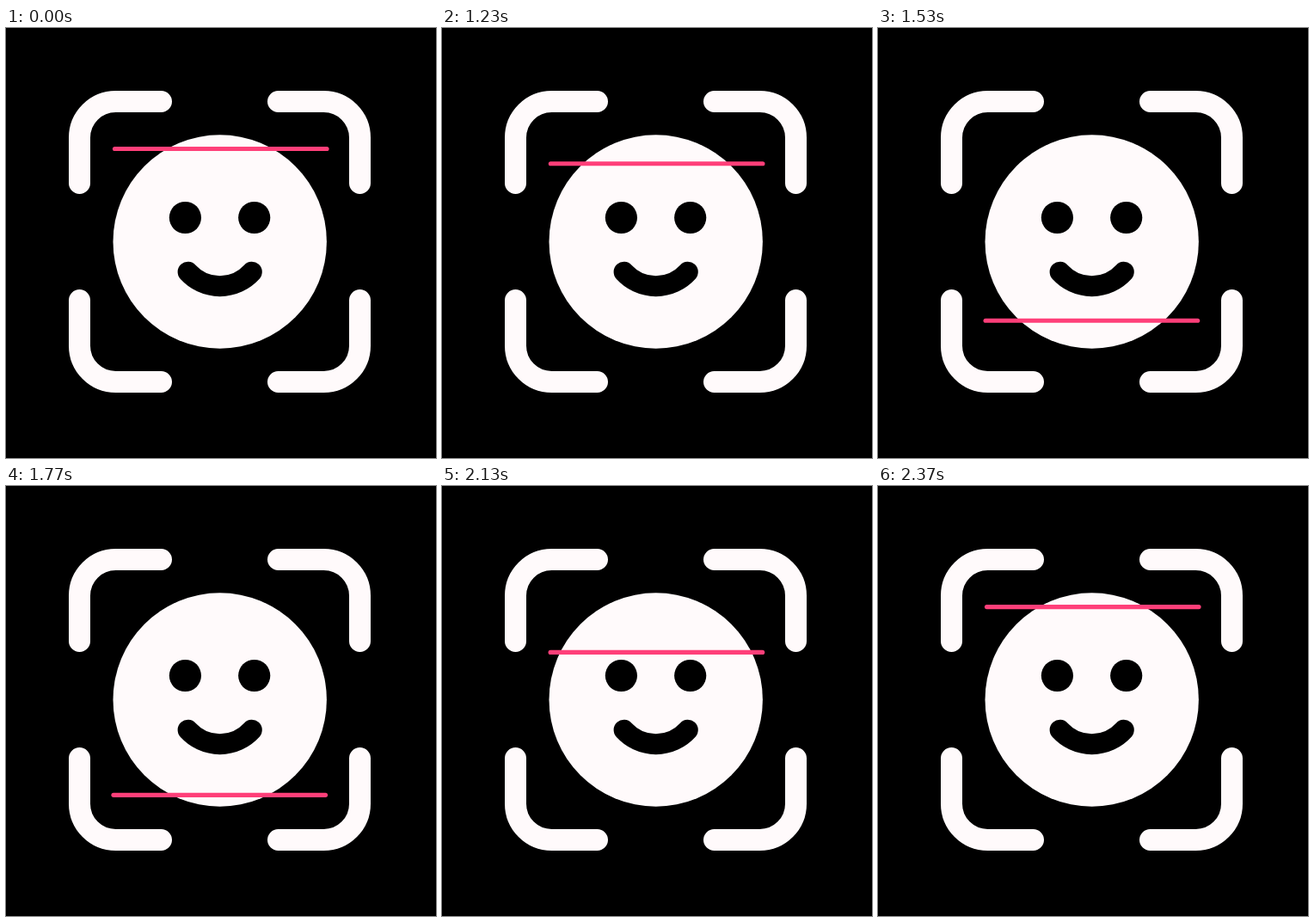
These frames come from a looping animation (500x500 px, 3.43 s). An HTML page:

```html
<!DOCTYPE html>
<html lang="en">
<head>
<meta charset="utf-8">
<title>Face scan</title>
<style>
  html, body { margin: 0; width: 100%; height: 100%; overflow: hidden; background: #000; }
  svg { display: block; width: 100%; height: 100%; }
</style>
</head>
<body>
<svg viewBox="0 0 500 500" fill="none" stroke-linecap="round">
  <path stroke="#fffafb" stroke-width="25" d="
    M85.5 180.5V127.5A42 42 0 0 1 127.5 85.5H180.5
    M316.5 85.5H369.5A42 42 0 0 1 411.5 127.5V180.5
    M411.5 316.5V369.5A42 42 0 0 1 369.5 411.5H316.5
    M180.5 411.5H127.5A42 42 0 0 1 85.5 369.5V316.5"/>
  <circle cx="248.7" cy="248.5" r="124.2" fill="#fffafb"/>
  <circle cx="208.4" cy="220.5" r="18.6" fill="#000"/>
  <circle cx="288.7" cy="220.5" r="18.6" fill="#000"/>
  <path stroke="#000" stroke-width="24" d="M211.6 283.7A50.1 50.1 0 0 0 285.8 283.7"/>
  <path id="beam" stroke="#ff3f79" stroke-width="5.2" d="M126.5 0H373"/>
</svg>
<script>
  const LOOP = 3430;
  const FPS = 30;
  const TOP = 140.5;
  const TRAVEL = 219;
  const DRIFT = -1.5;
  const SWEEP = 20; // frames per pass
  const DOWN = 31.6;
  const UP = 51.85;
  const beam = document.getElementById('beam');

  function ease(s) {
    s = Math.min(1, Math.max(0, s));
    return s < 0.5 ? 4 * s ** 3 : 1 - 4 * (1 - s) ** 3;
  }

  function draw(ms) {
    // the beam advances in discrete steps
    const frame = Math.floor((ms % LOOP) * FPS / 1000 + 0.15);
    const moving = frame >= 33 && frame <= 71;
    const depth = moving ? ease((frame - DOWN) / SWEEP) - ease((frame - UP) / SWEEP) : 0;
    beam.setAttribute('transform', `translate(${DRIFT * depth} ${TOP + TRAVEL * depth})`);
  }

  const start = performance.now();
  function tick() {
    draw(performance.now() - start);
    requestAnimationFrame(tick);
  }
  tick();
</script>
</body>
</html>
```
